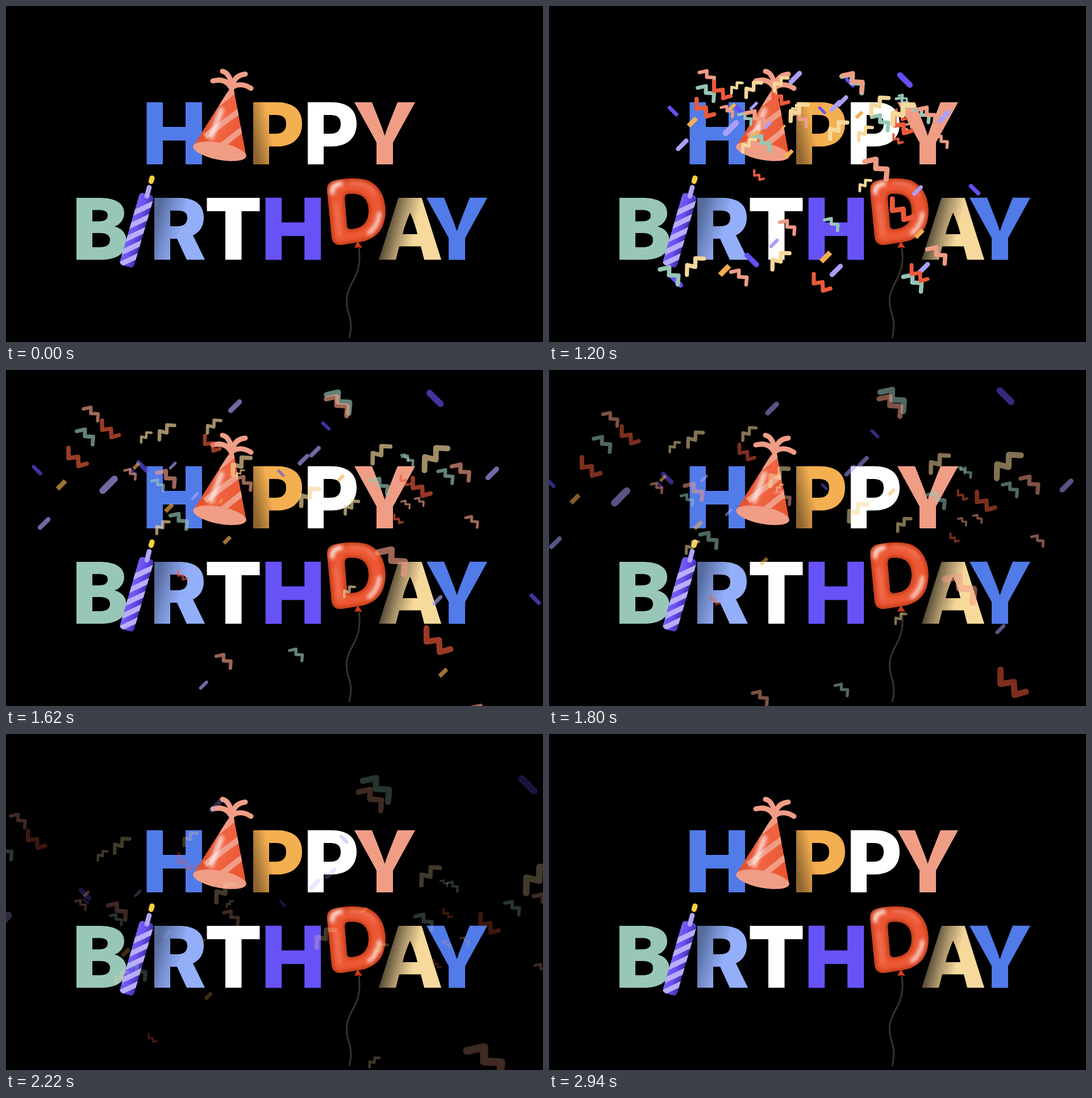
An HTML page with a canvas for the animation above (4.53 s loop, 945 by 592 pixels).

```html
<!DOCTYPE html>
<html lang="en">
<head>
<meta charset="utf-8">
<title>Happy Birthday</title>
<style>
  html, body { margin: 0; width: 100%; height: 100%; overflow: hidden; background: #000; }
  svg, canvas { position: absolute; left: 0; top: 0; width: 945px; height: 592px; }
</style>
</head>
<body>
<svg viewBox="0 0 945 592" role="img" aria-label="HAPPY BIRTHDAY" fill-rule="evenodd">
  <defs>
    <linearGradient id="orangeShade" gradientUnits="userSpaceOnUse" x1="435" y1="235" x2="468" y2="228">
      <stop stop-color="#8f652e"/><stop offset=".35" stop-color="#b27f3b"/><stop offset="1" stop-color="#f4af50"/>
    </linearGradient>
    <linearGradient id="blueShade" gradientUnits="userSpaceOnUse" x1="258" y1="395" x2="305" y2="408">
      <stop stop-color="#566a9d"/><stop offset=".4" stop-color="#7189c6"/><stop offset="1" stop-color="#93aff9"/>
    </linearGradient>
    <linearGradient id="creamShade" gradientUnits="userSpaceOnUse" x1="664" y1="418" x2="712" y2="430">
      <stop stop-color="#574b36"/><stop offset=".45" stop-color="#a89268"/><stop offset="1" stop-color="#f8d99c"/>
    </linearGradient>
    <linearGradient id="candleShade">
      <stop stop-color="#7461ee"/><stop offset=".45" stop-color="#6a50f5"/><stop offset="1" stop-color="#4630b0"/>
    </linearGradient>
    <linearGradient id="coneShade" gradientUnits="userSpaceOnUse" x1="350" y1="205" x2="420" y2="228">
      <stop stop-color="#e3512f"/><stop offset=".4" stop-color="#f06443"/><stop offset="1" stop-color="#e9552f"/>
    </linearGradient>
    <filter id="soft" x="-50%" y="-50%" width="200%" height="200%"><feGaussianBlur stdDeviation="3"/></filter>
    <path id="H" d="M247.5 169.5H276V213h40v-43.5h29V279h-29v-42h-40v42h-28.5z"/>
    <path id="P" d="M435 169.5h41c28 0 45 12 45 38 0 27-19 40-44 40h-14V279h-28zM463 192v33h12c12 0 18-6 18-17.5 0-11-6-15.5-18-15.5z"/>
    <path id="Y" d="M613 169.5h31l13 33q5 12 9.5 26 4.5-14 9.5-26l13-33h31l-39 71V279h-29v-38.5z"/>
    <path id="cone" d="M392 148Q397 144 401 148L423 266Q380 268 330 246Z"/>
    <path id="balloon" d="M580 307Q610 301 632 306C660 313 671 345 667 372 663 400 645 414 615 417L590 421Q575 422 573 407L565 325Q564 310 580 307zM603 331Q596 331 596 340L600 388Q601 394 608 393C628 392 639 380 638 358 637 338 625 329 603 331z"/>
    <clipPath id="inCone"><use href="#cone"/></clipPath>
    <clipPath id="inBalloon"><use href="#balloon" clip-rule="evenodd"/></clipPath>
    <clipPath id="inCandle"><rect x="-13" y="-66" width="26" height="132" rx="6"/></clipPath>
  </defs>

  <use href="#H" fill="#517be8"/>
  <use href="#P" fill="url(#orangeShade)"/>
  <use href="#P" x="96" fill="#fff"/>
  <use href="#Y" fill="#f09d86"/>

  <g id="hat">
    <use href="#cone" fill="url(#coneShade)"/>
    <g clip-path="url(#inCone)">
      <path d="M404 147L374 172M413 183L350 230M420 214L372 252" stroke="#f09d86" stroke-width="10"/>
      <path d="M379 183Q369 209 361 231" stroke="#fff" stroke-opacity=".75" stroke-width="9" stroke-linecap="round" fill="none" filter="url(#soft)"/>
    </g>
    <ellipse cx="376" cy="256" rx="47.5" ry="15" transform="rotate(11 376 256)" fill="#f09d86"/>
    <path d="M397 146Q388 126 364 132M397 146Q396 119 381 115M397 146Q400 122 421 120M397 144Q412 133 431 145" fill="none" stroke="#f09d86" stroke-width="9" stroke-linecap="round"/>
  </g>

  <path fill="#98c7b8" d="M124 338h40c26 0 44 8 44 27 0 11-7 20-17 23.5 12 3 21 11 21 26 0 22-18 32.5-45 32.5h-43zM152 359.5v20h11c11 0 16-4 16-10.5 0-7-5-9.5-16-9.5zM152 400v25h13c13 0 18-5 18-13 0-8-6-12-18-12z"/>
  <path fill="url(#blueShade)" d="M261 338h43c25 0 44 9 44 35 0 16-8 26-19 31l21 43h-32l-17-37h-12v37h-28zM289 360.5V388h13c11 0 17-5 17-15 0-9-6-12.5-17-12.5z"/>
  <path fill="#fff" d="M353.5 338h93v23.5h-32V447H386v-85.5h-32.5z"/>
  <use href="#H" x="209.2" y="168.2" fill="#6752f8"/>
  <path fill="url(#creamShade)" d="M656 447L690.5 338h41L766 447h-30l-6-23.5h-38l-6 23.5zM698 402h26l-2.5-10q-5-16-10-27h-1q-5 12-10 27z"/>
  <use href="#Y" x="127" y="168.2" fill="#517be8"/>

  <g id="candle" stroke-linecap="round">
    <g transform="translate(230 395) rotate(16.2)">
      <rect x="-13" y="-66" width="26" height="132" rx="6" fill="url(#candleShade)"/>
      <path clip-path="url(#inCandle)" d="M-18-24L18-56M-18 0L18-32M-18 24L18-8M-18 48L18 16M-18 72L18 40M-18 96L18 64" stroke="#b9aefb" stroke-width="9"/>
    </g>
    <path d="M252 319.5L248 335" stroke="#b2a5fc" stroke-width="8.5"/>
    <path d="M257 303L255.3 309" stroke="#fbd03c" stroke-width="9"/>
  </g>

  <g id="balloon-letter" fill="none">
    <path d="M621 426C624 450 621 465 612 482 600 503 596 518 602 538 607 553 609 565 604 585" stroke="#333" stroke-width="3"/>
    <path d="M619 414L613 426.5Q620 424 627 426.5z" fill="#d23c17"/>
    <use href="#balloon" fill="#ec5835"/>
    <g clip-path="url(#inBalloon)">
      <use href="#balloon" stroke="#b93210" stroke-width="6" filter="url(#soft)"/>
      <g stroke="#fff" stroke-linecap="round" filter="url(#soft)">
        <path d="M574 329Q573 315 589 313" stroke-width="7" stroke-opacity=".9"/>
        <path d="M657 366Q654 388 639 400" stroke-width="7" stroke-opacity=".75"/>
        <path d="M606 312Q636 309 650 331M581 350L587 404" stroke-width="5" stroke-opacity=".2"/>
      </g>
    </g>
  </g>
</svg>
<canvas width="945" height="592"></canvas>

<script>
const ctx = document.querySelector('canvas').getContext('2d');
const LOOP = 4530, STEP = 30, START = 1020, END = 2940, POSE = 600;
const CENTER = { x: 475, y: 305 };

// Unit polylines, scaled by the size of a piece.
const rising = [[-.32, .32], [.32, -.32]];
const falling = [[-.32, -.32], [.32, .32]];
const stairs = [[-.41, -.27], [0, -.36], [-.01, -.02], [.4, 0], [.37, .38]];
const climb = [[-.38, .39], [-.37, -.06], [0, .03], [.01, -.37], [.4, -.35]];
const drop = [[-.38, -.38], [-.38, .06], [.03, 0], [.05, .4], [.4, .3]];

// spots: x, y and size of the pieces 600 ms after the burst.
const kinds = [
  { color: '#6450f0', shape: falling, spots: [
    [751, 51, 30], [59, 175, 18], [243, 169, 22], [562, 98, 16], [926, 400, 20]] },
  { color: '#aaa0fb', shape: rising, spots: [
    [404, 64, 24], [185, 201, 32], [72, 268, 22], [523, 157, 20],
    [543, 143, 20], [851, 181, 24], [349, 550, 16], [756, 402, 18]] },
  { color: '#f4af50', shape: rising, flat: true, spots: [
    [102, 201, 22], [289, 241, 20], [390, 297, 18], [766, 528, 20], [588, 189, 16]] },
  { color: '#98c7b8', shape: stairs, spots: [
    [583, 58, 50], [143, 117, 36], [306, 264, 36], [269, 201, 26],
    [770, 186, 32], [510, 497, 28], [655, 203, 36]] },
  { color: '#f09d86', shape: stairs, spots: [
    [153, 77, 32], [221, 182, 24], [284, 190, 38], [419, 198, 32], [675, 334, 58],
    [796, 179, 38], [816, 265, 26], [384, 508, 32], [581, 64, 46]] },
  { color: '#ec5a3a', shape: drop, spots: [
    [130, 152, 41], [187, 103, 38], [364, 128, 34], [728, 204, 40], [756, 470, 54], [312, 358, 20]] },
  { color: '#f8d99c', shape: climb, spots: [
    [285, 109, 34], [367, 99, 30], [415, 168, 40], [752, 156, 52], [658, 148, 40],
    [278, 275, 28], [607, 240, 30], [534, 222, 40], [603, 387, 24]] },
];

let seed = 11;
const random = () => (seed = seed * 16807 % 2147483647) / 2147483647;
const isPill = kind => kind.shape.length === 2;

// A few small pieces fill the gaps, and some fall below the stage.
for (const kind of kinds) {
  for (let i = 0; i < 4; i++) {
    const low = i % 2;
    const x = CENTER.x + (random() - .5) * (low ? 950 : 500);
    const y = low ? 600 + random() * 90 : 110 + random() * 150;
    const size = (low ? 34 : 15) + random() * 10;
    kind.spots.push([x, y, isPill(kind) ? size * .65 : size]);
  }
}

const spread = t => .5 * (1 - Math.exp(-t / 100)) + .00088 * t - 1e-7 * t * t;
const fall = t => 83 * (t / POSE) ** 1.78;

function drawPiece(kind, [x, y, size], reach, sink) {
  // Larger pieces fly towards the viewer, smaller ones away.
  const depth = isPill(kind) ? .022 * (size - 21) : .0145 * (size - 35);
  const zoom = (1 - depth) / (1 - depth * reach);
  const px = CENTER.x + zoom * (x - CENTER.x) * reach;
  const py = CENTER.y + zoom * ((y - CENTER.y - fall(POSE)) * reach + sink);
  const scale = size * zoom;
  ctx.strokeStyle = kind.color;
  ctx.lineCap = kind.flat ? 'butt' : 'round';
  ctx.lineWidth = scale * (isPill(kind) ? .37 : .19);
  ctx.beginPath();
  for (const [u, v] of kind.shape) ctx.lineTo(px + u * scale, py + v * scale);
  ctx.stroke();
}

function draw(now) {
  const time = Math.floor(now % LOOP / STEP) * STEP;
  ctx.clearRect(0, 0, 945, 592);
  if (time >= START && time < END) {
    const t = time - START + 15;
    const reach = spread(t) / spread(POSE), sink = fall(t);
    const left = (END - time) / (END - START);
    ctx.globalAlpha = Math.min(1, 1.15 * left ** 1.5);
    ctx.lineJoin = 'round';
    for (const kind of kinds)
      for (const spot of kind.spots) drawPiece(kind, spot, reach, sink);
  }
  requestAnimationFrame(() => draw(performance.now() - begin));
}

const begin = performance.now();
draw(0);
</script>
</body>
</html>
```
